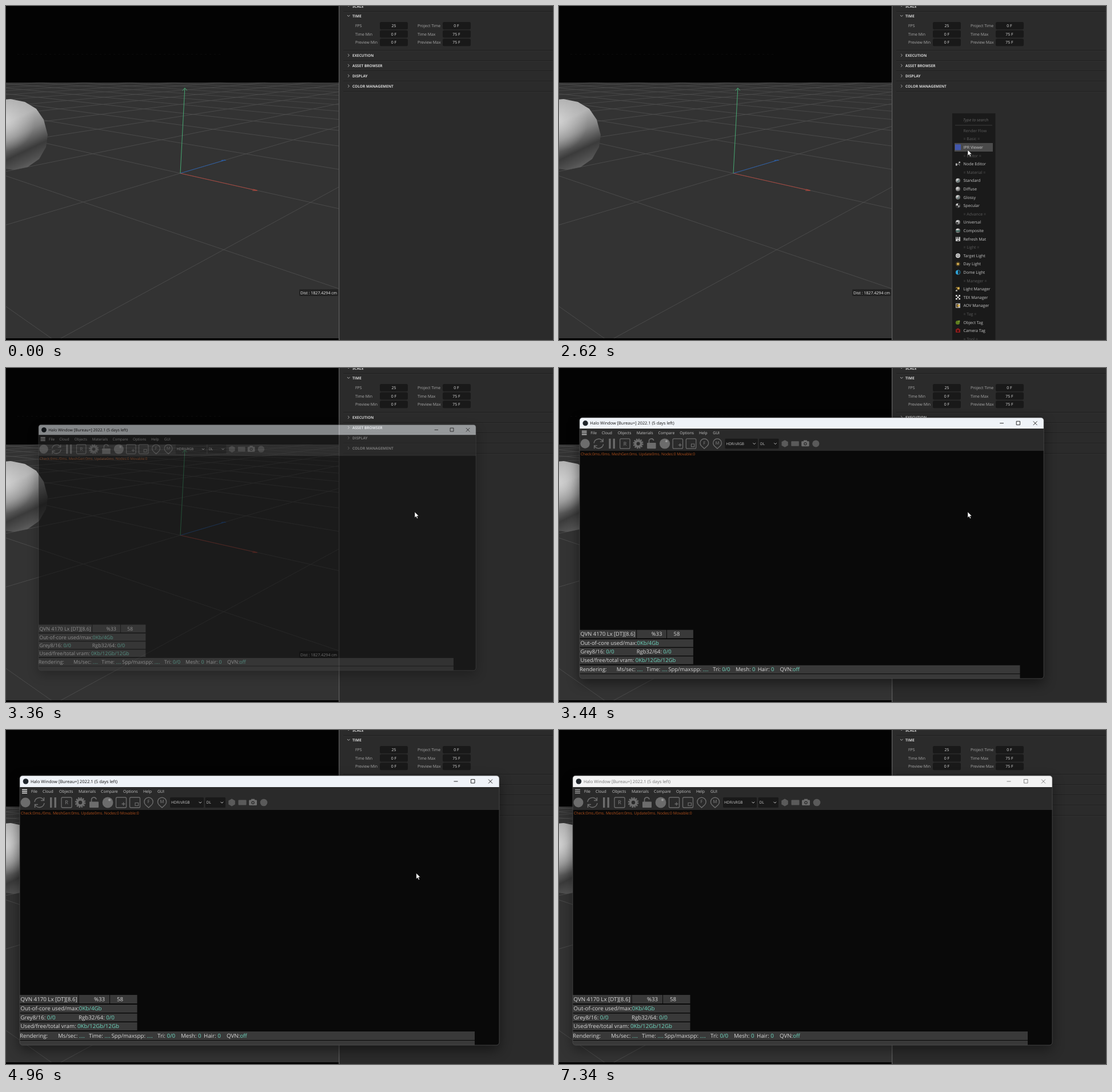
An HTML page that plays this animation: 957x585 px, repeating every 7.67 s.

```html
<!DOCTYPE html>
<html lang="en">
<head>
<meta charset="utf-8">
<title>Opening the render window</title>
<style>
html, body { margin: 0; width: 100%; height: 100%; overflow: hidden; background: #2b2b2b; }
svg { display: block; }
text { font-family: "Open Sans", "Noto Sans", sans-serif; text-rendering: geometricPrecision; white-space: pre; }
</style>
</head>
<body>
<svg id="stage" width="957" height="585" viewBox="0 0 957 585">
  <defs>
    <clipPath id="floor"><rect y="134" width="582" height="448"/></clipPath>
    <clipPath id="frame"><rect x="24" y="80" width="839" height="472" rx="5"/></clipPath>
    <linearGradient id="ball" gradientUnits="userSpaceOnUse" x1="5" y1="163" x2="60" y2="278">
      <stop offset="0" stop-color="#a8a8a8"/><stop offset=".28" stop-color="#b2b2b2"/>
      <stop offset=".5" stop-color="#858585"/><stop offset=".74" stop-color="#3b3b3b"/>
      <stop offset=".88" stop-color="#505050"/><stop offset="1" stop-color="#686868"/>
    </linearGradient>
    <radialGradient id="shine" gradientUnits="userSpaceOnUse" cx="-4" cy="200" r="55">
      <stop offset="0" stop-color="#d8d8d8" stop-opacity=".9"/><stop offset="1" stop-color="#c8c8c8" stop-opacity="0"/>
    </radialGradient>
    <radialGradient id="bead" cx=".35" cy=".3" r=".8">
      <stop offset="0" stop-color="#e2e2e2"/><stop offset="1" stop-color="#555"/>
    </radialGradient>
    <filter id="blur" x="-10%" y="-15%" width="120%" height="130%"><feGaussianBlur stdDeviation="11"/></filter>
  </defs>
  <g id="view"></g>
  <g id="panel"></g>
  <g id="menu"></g>
  <g id="win"></g>
  <circle id="press" cx="687.5" cy="187.2" r="8" fill="#ddd" fill-opacity=".35"/>
  <path id="cursor" d="M0 0V10.2L2.4 8L4.1 11.8L5.7 11.1L4.1 7.4L7.2 7.2Z" fill="#fff" stroke="#111" stroke-width=".6"/>
</svg>
<script>
const LOOP = 7670;
const $ = id => document.getElementById(id);
const clamp = v => Math.max(0, Math.min(1, v));

// ---- drawing helpers ----
const rect = (x, y, w, h, fill, more = '') =>
  `<rect x="${x}" y="${y}" width="${w}" height="${h}" fill="${fill}" ${more}/>`;
const path = (d, stroke, width = 1, more = '') =>
  `<path d="${d}" fill="none" stroke="${stroke}" stroke-width="${width}" ${more}/>`;
const disc = (x, y, r, fill, more = '') =>
  `<circle cx="${x}" cy="${y}" r="${r}" fill="${fill}" ${more}/>`;
// y is the middle of the capitals
const text = (x, y, str, size, fill, more = '') =>
  `<text x="${x}" y="${y + size * .36}" font-size="${size}" fill="${fill}" ${more}>${str}</text>`;
const MID = 'text-anchor="middle"';

// ---- 3D view ----
function drawView() {
  const O = [305, 293], A = [-630, 84], B = [1010, 84], a = .196, b = .1943;
  const ground = (u, v) => [0, 1].map(i =>
    (O[i] + u * a * A[i] + v * b * B[i]) / (1 + u * a + v * b));
  const ray = (V, P) => {
    const k = (640 - V[1]) / (P[1] - V[1]);
    return `M${V}L${V[0] + (P[0] - V[0]) * k} 640`;
  };
  let lines = '';
  for (let i = -2; i <= 16; i++) {
    const fade = `opacity="${i < 3 ? 1 : Math.max(.45, 1 - (i - 3) * .05)}"`;
    lines += path(ray(A, ground(0, i)), '#4d4d4d', .9, fade);
    if (i > -2) lines += path(ray(B, ground(i, 0)), '#4d4d4d', .9, fade);
  }
  const outline = 'M-2 164L8 163L33 168L53 180L66 199L73 226L70 247L58 268L38 282L14 287L-2 285Z';
  $('view').innerHTML = rect(0, 0, 583, 585, '#030303') +
    path('M20 84.500H380', '#0b0b0b', 1, 'stroke-dasharray="3 5"') +
    rect(0, 134, 582, 448, '#333') +
    `<g clip-path="url(#floor)">${lines}</g>` +
    `<path d="${outline}" fill="url(#ball)"/><path d="${outline}" fill="url(#shine)"/>` +
    path('M305 293L438 323M431 323.200H440M432 321L439 322.800', '#a9473e') +
    path('M305 293L383 270M377 270.200H385M376 271.500L383 269.800', '#2b5ea6') +
    path('M305 293L312.800 144M308.800 148.500L312.800 143.500L316.800 148', '#46a872') +
    rect(513, 496, 68, 12, '#1d1d1d', 'rx="2" opacity=".75"') +
    text(515, 502, 'Dist : 1827.4294 cm', 7.05, '#eee');
}

// ---- settings panel ----
function drawPanel() {
  const head = (y, str, open) =>
    path(open ? `M597 ${y - 2}l2.300 2.300l2.300 -2.300` : `M598.200 ${y - 3}l2.300 2.300l-2.300 2.300`, '#bbb', .9) +
    text(606, y, str, 6.55, '#d6d6d6', 'font-weight="700"');
  const field = (x, y, label, value) =>
    text(x, y, label, 6.95, '#a9a9a9') +
    rect(x < 700 ? 654 : 764, y - 6.5, 49, 13, '#191919', 'rx="2.5"') +
    text(x < 700 ? 678.5 : 788, y, value, 6.95, '#ddd', MID);
  let out = rect(583, 0, 374, 585, '#2b2b2b') + rect(582, 0, 1.4, 585, '#5a5a5a');
  for (const y of [9, 77, 95, 113, 131, 149])
    out += rect(590, y, 367, 1, '#202020') + rect(590, y + 1, 367, .6, '#323232');
  out += head(.5, 'SCALE', true) + head(18, 'TIME', true);
  ['EXECUTION', 'ASSET BROWSER', 'DISPLAY', 'COLOR MANAGEMENT'].forEach((s, i) => out += head(87 + i * 18, s));
  out += field(611, 34.5, 'FPS', '25') + field(720, 34.5, 'Project Time', '0 F') +
    field(611, 49, 'Time Min', '0 F') + field(720, 49, 'Time Max', '75 F') +
    field(611, 63.7, 'Preview Min', '0 F') + field(720, 63.7, 'Preview Max', '75 F');
  $('panel').innerHTML = out;
}

// ---- pop-up menu ----
const ball = more => disc(0, 0, 4, 'url(#bead)') + (more || '');
const ICONS = {
  'IPR Viewer': rect(-5, -5, 10, 10, '#4257ad'),
  'Node Editor': rect(-4, -1, 2.6, 4, '#bbb') + rect(1.500, -4, 2.500, 2.500, '#bbb') + path('M-1 1H1V-2M2.700 0V3', '#999', .8),
  'Standard': ball(path('M-2 1L2 2.500M0 0L3 -1', '#4a6a68', 1.2)),
  'Diffuse': ball(),
  'Glossy': ball(path('M-2 1L2 2.500M0 0L3 -1', '#4a6a68', 1.2)),
  'Specular': ball(`<path d="M0 0V-4A4 4 0 0 1 4 0ZM0 0V4A4 4 0 0 1 -4 0Z" fill="#2c2c2c"/>`),
  'Universal': ball(disc(-1.5, 1, 1.6, '#222')),
  'Composite': ball(rect(-4, -.2, 8, 2, '#2d5a50')),
  'Refresh Mat': rect(-4, -3.5, 8, 7.5, '#c4c4c4') + path('M-2 -4V0M1 -4V0M-1 2.500H2', '#222', 1.2),
  'Target Light': disc(0, 0, 4, '#d0d0d0') + disc(0, 0, 2.2, '#777') + disc(0, 0, 1.1, '#eee'),
  'Day Light': path('M-4 0H4M0 -4V4M-3 -3L3 3M-3 3L3 -3', '#c39a3c', .8) + disc(0, 0, 1.9, '#e0b552'),
  'Dome Light': disc(0, 0, 4, '#1e2f38') + `<path d="M0 -4A4 4 0 0 0 0 4Z" fill="#2ea3d6"/>` + path('M0 -4A4 4 0 0 1 0 4', '#2ea3d6', .7),
  'Light Manager': path('M-4 -2H3M-2 -4L2 2M2 -4L-3 3', '#c39a3c', .9) + disc(1, -1, 2, '#e0b552') + rect(-4, 2, 3, 2, '#bbb'),
  'TEX Manager': rect(-4, -4, 8, 8, '#e6e6e6') + [[-1.3, -4], [-4, -1.3], [1.4, -1.3], [-1.3, 1.4]].map(p => rect(p[0], p[1], 2.7, 2.7, '#111')).join(''),
  'AOV Manager': rect(-4, -4, 8, 8, '#b9b9b9') + rect(-3, -3, 3.5, 6, '#5d4b30') + disc(1, 0, 2, '#d6a93d'),
  'Object Tag': disc(-.5, .5, 3.6, '#5f7d1f') + disc(2, -2, 1.5, '#7f9c35'),
  'Camera Tag': rect(-4, -2.5, 8, 6, '#8c1d1d', 'rx="1"') + rect(-2, -4, 4, 2, '#8c1d1d') + disc(0, .5, 1.8, '#3a0c0c')
};
function drawMenu() {
  const rows = ('Render Flow|= Basic =|IPR Viewer|= Editor =|Node Editor|= Material =|Standard|Diffuse|Glossy|' +
    'Specular|= Advance =|Universal|Composite|Refresh Mat|= Light =|Target Light|Day Light|Dome Light|' +
    '= Maneger =|Light Manager|TEX Manager|AOV Manager|= Tag =|Object Tag|Camera Tag|= Tool =').split('|');
  let out = rect(688, 188, 75.5, 397, '#1a1a1a') +
    text(707, 199, 'Type to search', 7.05, '#666', 'font-style="italic"') + rect(693, 208.5, 65, .8, '#444') +
    rect(692, 240, 67, 15, '#4a4a4a', 'id="hot"');
  rows.forEach((s, i) => {
    const y = 218.2 + i * 14.6, icon = ICONS[s];
    out += text(707.5, y, s, 7.05, icon ? '#c9c9c9' : '#5c5c5c');
    if (icon) out += `<g transform="translate(698 ${y})">${icon}</g>`;
  });
  $('menu').innerHTML = out;
}

// ---- render window ----
function drawWindow() {
  const G = '#6c6c6c', y = 127, teal = s => `<tspan fill="#6fd8c0">${s}</tspan>`;
  const letter = (x, s) => text(x, y - .3, s, 9.5, G, MID + ' font-weight="600"');
  const box = x => path(`M${x - 7} ${y - 9}h14q2 0 2 2v14q0 2 -2 2h-14q-2 0 -2 -2v-14q0 -2 2 -2Z`, G, 1.3);
  const pin = (x, s) => path(`M${x} ${y + 9}L${x - 5} ${y + 4.500}A7.600 7.600 0 1 1 ${x + 5} ${y + 4.500}Z`, G, 1.4) +
    text(x, y - 1.5, s, 8, G, MID + ' font-weight="600"');
  const combo = (x, w, s) => rect(x, 118, w, 18, '#191919', 'rx="1.5"') + text(x + 2, y, s, 6.6, '#ccc') +
    path(`M${x + w - 8.500} 125.800l2.300 2.300l2.300 -2.300`, '#ccc', 1);

  const tools = disc(34, y, 8.5, G) +
    path(`M50 ${y - 1}A8.600 8.600 0 0 1 66 ${y - 4}M67 ${y + 1}A8.600 8.600 0 0 1 51 ${y + 4}M66.500 ${y - 9}V${y - 3.500}H61M50.500 ${y + 9}V${y + 3.500}H56`, G, 1.5) +
    rect(77, 118, 3.4, 18, G) + rect(84.5, 118, 3.4, 18, G) +
    box(106) + letter(106, 'R') +
    disc(130, y, 5.2, 'none', `stroke="${G}" stroke-width="4"`) +
    disc(130, y, 8, 'none', `stroke="${G}" stroke-width="2.6" stroke-dasharray="2.5 1.69"`) +
    rect(146, 125.5, 16, 10.5, G, 'rx="1"') + path('M149.500 126V122.500A4.300 4.300 0 0 1 158 121.500', G, 1.6) +
    disc(178, y, 9.4, G) + disc(181, 122.5, 2, '#999') +
    box(201.5) + path('M205.500 126.500v6M202.500 129.500h6', G, 1.3) +
    box(225.5) + path('M226 127.500h5.500v5h-5.500Z', G, 1.2) +
    pin(249.5, 'F') + pin(273, 'M') +
    combo(287, 59, 'HDR/sRGB') + combo(348.5, 35.5, 'DL') +
    `<path d="M395 120.500l5.800 3.200v6.600l-5.800 3.200l-5.800 -3.200v-6.600Z" fill="#5a5a5a"/>` +
    rect(406.5, 122.5, 14, 9, '#5a5a5a', 'rx="1"') +
    rect(425, 122.5, 14, 9.5, G, 'rx="1.5"') + rect(429, 120.8, 6, 3, G) + disc(432, 127.3, 2.8, '#2b2b2b') + disc(432, 127.3, 1.5, G) +
    disc(451, y, 6.3, '#5a5a5a');

  const names = [['File', 44], ['Cloud', 64], ['Objects', 93], ['Materials', 127], ['Compare', 166],
    ['Options', 205], ['Help', 240], ['GUI', 265]];
  const BAR = '#393939', S = 9.72, W = '#d8d8d8';
  const info = (x, yy, s) => text(x, yy, s, S, W);

  $('win').innerHTML =
    rect(24, 88, 839, 472, '#000', 'rx="6" id="shade" filter="url(#blur)"') +
    `<g clip-path="url(#frame)">` + rect(24, 80, 839, 472, '#090909') +
    rect(24, 80, 839, 20, '#eff3f8') + rect(24, 80, 839, 20, '#f3f3f3', 'id="pale"') +
    rect(833, 80, 30, 20, '#c42b1c', 'id="red"') +
    disc(34.5, 90, 4.8, '#20262c') +
    `<g id="title">` + text(43, 90, 'Halo Window [Bureau+] 2022.1 (5 days left)', 7.6, '#111') +
    path('M783.500 90H790.500M813.500 86.500h6.500v6.500h-6.500Z', '#111', .9) + `</g>` +
    path('M844 86.500l7 7M851 86.500l-7 7', '#111', .9, 'id="close"') +
    rect(24, 100, 839, 40, '#2a2a2a') +
    path('M28 104.500H37M28 107.500H37M28 110.500H37', '#e8e8e8', 1.3, 'id="burger"') +
    names.map(([s, x]) => text(x, 107.5, s, 6.95, '#c8c8c8')).join('') + tools +
    text(26, 145.5, 'Check:0ms./0ms. MeshGen:0ms. Update0ms. Nodes:0 Movable:0', 6.84, '#b0501c') +
    rect(24, 464, 102.5, 15, BAR) + rect(127.5, 464, 53.5, 15, BAR) + rect(182, 464, 47.5, 15, BAR) +
    [481, 496.5, 512].map(v => rect(24, v, 205.5, 14, BAR)).join('') +
    rect(24, 528, 796, 15, BAR) + rect(24, 544, 796, 8, BAR) +
    info(25.5, 471.5, 'QVN 4170 Lx [DT][8.6]') + info(154, 471.5, '%33') + info(194, 471.5, '58') +
    info(25.5, 488, 'Out-of-core used/max:' + teal('0Kb/4Gb')) +
    info(25.5, 503.5, 'Grey8/16: ' + teal('0/0')) + info(127, 503.5, 'Rgb32/64: ' + teal('0/0')) +
    info(25.5, 519, 'Used/free/total vram: ' + teal('0Kb/12Gb/12Gb')) +
    [['Rendering:', 24], ['Ms/sec: ', 91, '....'], ['Time: ', 145, '....'], ['Spp/maxspp: ', 184.5, '....'],
      ['Tri: ', 265, '0/0'], ['Mesh: ', 306, '0'], ['Hair: ', 346, '0'], ['QVN:', 386, 'off']]
      .map(([s, x, v]) => info(x, 535.5, s + (v ? teal(v) : ''))).join('') +
    `</g>` + rect(24, 80, 839, 472, 'none', 'rx="5" stroke="#555" stroke-width=".7"');
}

// ---- motion ----
// index of the latest of n evenly spaced picture changes, -1 before the first
const tick = (t, from, to, n) => Math.min(n - 1, Math.floor((t - from) / ((to - from) / (n - 1)) + 1e-6));
const curve = (p, c, q, s) => [0, 1].map(i => (1 - s) * (1 - s) * p[i] + 2 * s * (1 - s) * c[i] + s * s * q[i]);
const smooth = s => s * s * (3 - 2 * s);

// from, to, steps, start, bend, end, easing
const MOVES = [
  [110, 860, 12, [943, 563], [835, 300], [688, 188], smooth],
  [1540, 2220, 11, [688, 188], [694, 228], [709, 254], smooth],
  [2350, 2620, 5, [709, 254], [712, 254], [715, 252], s => s],
  [4960, 5240, 5, [715, 252], [728, 246], [745, 231], smooth],
  [5510, 6260, 12, [745, 231], [801, 138], [860, 78], s => s * (1.15 - .15 * s)],
  [6320, 6750, 7, [858, 62], [912, 80], [944, 432], s => s]
];
function pointer(t) {
  if (t < 110 || t >= 6750) return null;
  const i = MOVES.filter(m => t >= m[0]).length - 1;
  const [from, to, n, p, c, q, ease] = MOVES[i], k = tick(t, from, to, n);
  const s = i === 0 ? k / (n - 1) : i === 5 ? k / (n - 2) : (k + 1) / n;
  return curve(p, c, q, ease(clamp(s)));
}

const OPENING = [3180, 3290, 3360, 3440, 3500, 3570, 3640];
const show = (id, on) => $(id).setAttribute('visibility', on ? 'visible' : 'hidden');
const fade = (id, v) => $(id).setAttribute('opacity', v);

function render(t) {
  const at = pointer(t);
  show('cursor', at);
  if (at) $('cursor').setAttribute('transform', `translate(${at})`);
  show('press', t >= 930 && t < 1070);

  const menu = t >= 1340 && t < 3180;
  $('menu').style.display = menu ? '' : 'none';
  fade('hot', menu && at[1] >= 240 && at[1] < 255 ? 1 : 0);

  const w = OPENING.filter(v => t >= v).pop() || 0;
  const seen = clamp((w - 3275) / 155);
  $('win').style.display = seen ? '' : 'none';
  fade('win', seen);
  const gap = .131 * Math.pow(1 - clamp((w - 3320) / 320), 3), k = 1 - gap;
  $('win').setAttribute('transform',
    `translate(${443.5 - gap * 45} ${316 - gap * 17}) scale(${k}) translate(-443.5 -316)`);

  const over = at && at[0] >= 833 && at[0] < 863 && at[1] >= 80 && at[1] < 100;
  const red = over ? 1 : t >= 6260 && t < 6320 ? .5 : t >= 6320 && t < 6390 ? .2 : 0;
  fade('red', red);
  $('close').setAttribute('stroke', red > .4 ? '#fff' : '#111');

  const idle = (tick(t, 7220, 7340, 3) + 1) / 3, off = clamp(idle);
  fade('pale', off);
  fade('title', 1 - .45 * off);
  fade('close', 1 - .45 * off);
  fade('burger', 1 - .4 * off);
  fade('shade', .5 - .1 * off);
}

drawView();
drawPanel();
drawMenu();
drawWindow();
const born = performance.now();
function loop() {
  render((performance.now() - born) % LOOP);
  requestAnimationFrame(loop);
}
loop();
</script>
</body>
</html>
```
